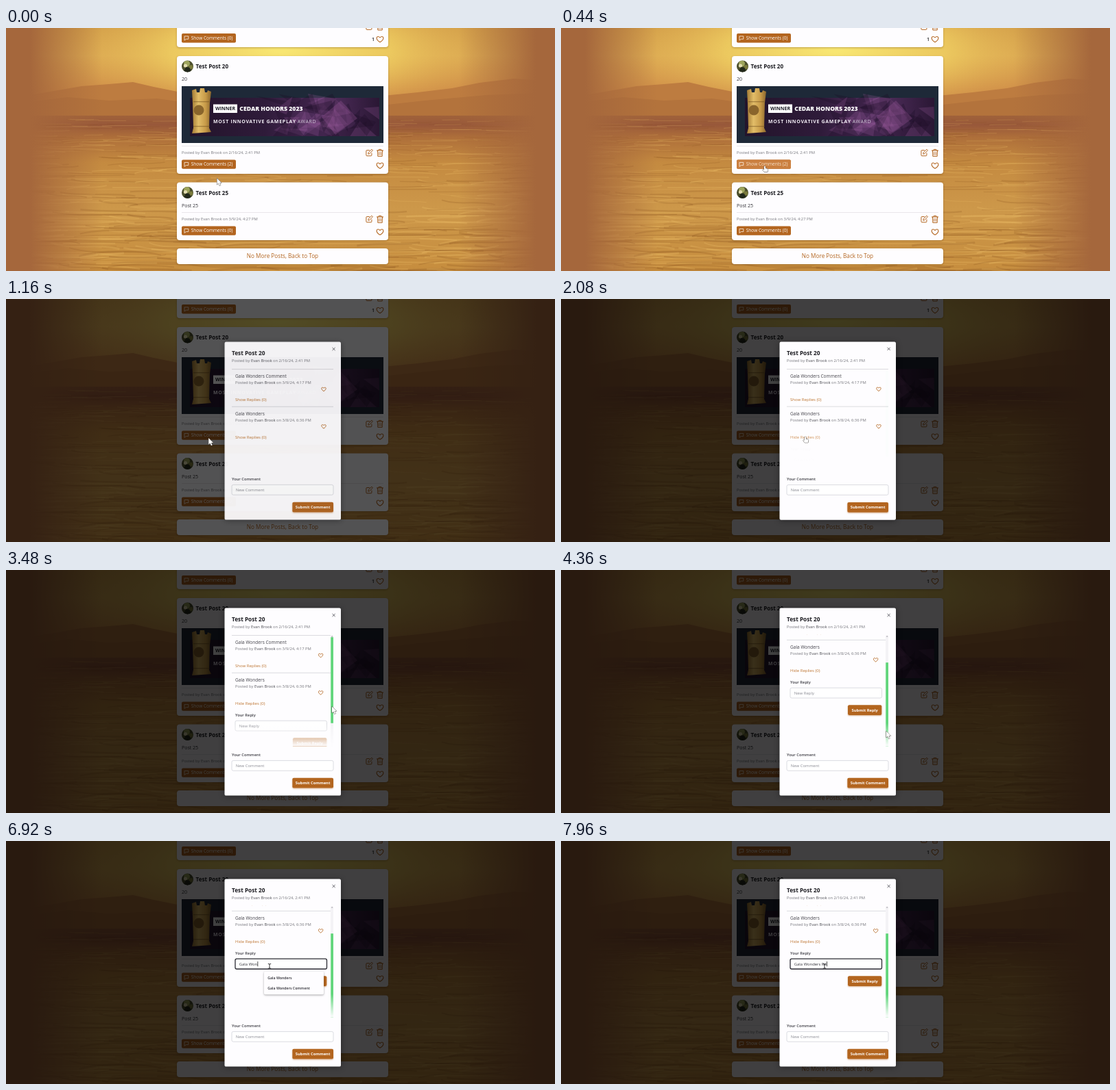
Write an HTML page with a canvas that moves like this. It is 800 by 355 pixels and loops after 8000 ms.

```html
<!DOCTYPE html>
<html lang="en">
<head>
<meta charset="utf-8">
<title>Post comments</title>
<style>
  html, body { margin: 0; width: 100%; height: 100%; overflow: hidden; background: #a5673c; }
  canvas { display: block; width: 100vw; height: 100vh; }
</style>
</head>
<body>
<canvas id="stage"></canvas>
<script>
const W = 800, H = 355, LOOP = 8000;
const FONT = '"Open Sans", "Noto Sans", sans-serif';
const AUTHOR = 'Evan Brook', TOPIC = 'Gala Wonders';
const BROWN = '#b3651f', INK = '#1d1d22', GREY = '#77777d';
const REPLY = TOPIC + ' Re';
const KEY_TIMES = [5400, 5760, 5960, 6160, 6440, 6720, 6840, 6920, 7160, 7200, 7240, 7320, 7680, 7800, 7960];
const dpr = window.devicePixelRatio || 1;

function layer(canvas = document.createElement('canvas')) {
  canvas.width = W * dpr;
  canvas.height = H * dpr;
  const c = canvas.getContext('2d');
  c.scale(dpr, dpr);
  return c;
}
const screen = layer(document.getElementById('stage'));
const scenery = layer(), dialog = layer();
let g = screen;

const clamp = (v) => Math.max(0, Math.min(1, v));
const span = (t, a, b) => clamp((t - a) / (b - a));
const smooth = (u) => u * u * (3 - 2 * u);
const mix = (a, b, u) => a + (b - a) * u;

function seeded(seed) {
  return () => (seed = (seed * 16807) % 2147483647) / 2147483647;
}

// ---------- drawing helpers ----------
function text(s, x, y, size, color = INK, weight = 400, align = 'left', spacing = 0) {
  g.font = `${weight} ${size}px ${FONT}`;
  g.letterSpacing = spacing + 'px';
  g.textAlign = align;
  g.fillStyle = color;
  g.fillText(s, x, y);
  const width = g.measureText(s).width;
  g.letterSpacing = '0px';
  return x + width;
}

function box(x, y, w, h, r, fill, stroke, line = 0.8) {
  g.beginPath();
  g.roundRect(x, y, w, h, r);
  if (fill) { g.fillStyle = fill; g.fill(); }
  if (stroke) { g.strokeStyle = stroke; g.lineWidth = line; g.stroke(); }
}

function shadowBox(x, y, w, h, r, color, blur) {
  g.save();
  g.shadowColor = color;
  g.shadowBlur = blur * dpr;
  g.shadowOffsetY = dpr;
  box(x, y, w, h, r, '#fefdff');
  g.restore();
}

function poly(points, fill) {
  g.beginPath();
  points.forEach(([x, y]) => g.lineTo(x, y));
  g.closePath();
  g.fillStyle = fill;
  g.fill();
}

function strokePath(d, x, y, color, width) {
  g.save();
  g.translate(x, y);
  g.strokeStyle = color;
  g.lineWidth = width;
  g.lineJoin = g.lineCap = 'round';
  g.stroke(new Path2D(d));
  g.restore();
}

function rule(x1, x2, y, color) {
  g.fillStyle = color;
  g.fillRect(x1, y, x2 - x1, 0.8);
}

function disc(x, y, r, fill) {
  g.beginPath();
  g.arc(x, y, r, 0, 7);
  g.fillStyle = fill;
  g.fill();
}

function gradient(x1, y1, x2, y2, ...stops) {
  const gr = g.createLinearGradient(x1, y1, x2, y2);
  stops.forEach(([at, color]) => gr.addColorStop(at, color));
  return gr;
}

// ---------- icons ----------
function heart(x, y, w, line) {
  g.beginPath();
  g.moveTo(x, y + 0.43 * w);
  g.bezierCurveTo(x - 0.85 * w, y - 0.1 * w, x - 0.4 * w, y - 0.68 * w, x, y - 0.24 * w);
  g.bezierCurveTo(x + 0.4 * w, y - 0.68 * w, x + 0.85 * w, y - 0.1 * w, x, y + 0.43 * w);
  g.strokeStyle = BROWN;
  g.lineWidth = line;
  g.stroke();
}

function tools(y) {
  strokePath('M0 -3.8H-3.6Q-4.6 -3.8 -4.6 -2.8V3.4Q-4.6 4.4 -3.6 4.4H2.4Q3.4 4.4 3.4 3.4V0.6' +
    'M-1.6 1.4L-1.2 -0.8 3.4 -5.2 5 -3.6 0.5 0.9Z', 529.5, y, BROWN, 1);
  strokePath('M-4.6 -3.4H4.6M-1.8 -3.4V-5H1.8V-3.4M-3.6 -3.4L-3.2 5H3.2L3.6 -3.4M-1.3 -1V3M1.3 -1V3',
    545, y, BROWN, 1);
}

function avatar(x, y) {
  g.save();
  g.beginPath();
  g.arc(x, y, 8.5, 0, 7);
  g.clip();
  g.fillStyle = '#4c4f2c';
  g.fillRect(x - 9, y - 9, 18, 18);
  disc(x - 1, y - 4, 4.5, '#9da45c');
  disc(x - 3, y - 1, 2.6, '#e2dcae');
  disc(x + 5, y + 1, 3, '#7a7b3c');
  poly([[x - 7, y + 9], [x - 2, y + 1], [x + 3, y + 2], [x + 6, y + 9]], '#22281a');
  g.restore();
}

function commentsButton(y, count, hover = 0) {
  box(256, y, 79, 13.4, 2, BROWN);
  g.globalAlpha = hover;
  box(256, y, 79, 13.4, 2, '#cb8040');
  g.globalAlpha = 1;
  strokePath('M-2.6 -2.6H2.8V1.6H-0.6L-2.6 3.2Z', 263, y + 6.6, '#fff4e8', 0.8);
  text(`Show Comments (${count})`, 269.8, y + 9, 6.5, hover > 0.5 ? '#f7e2cd' : '#fff');
}

// ---------- background ----------
function paintScenery() {
  g = scenery;
  const rnd = seeded(77);
  g.fillStyle = gradient(0, 0, 0, 135, [0, '#d3a04a'], [0.3, '#dcab53'], [0.65, '#d2934a'], [1, '#c08043']);
  g.fillRect(0, 0, W, 140);
  g.save();
  g.scale(1, 0.32);
  const glow = g.createRadialGradient(400, 100, 10, 400, 100, 310);
  glow.addColorStop(0, '#f8e672');
  glow.addColorStop(0.5, 'rgba(240,208,98,.8)');
  glow.addColorStop(1, 'rgba(225,170,80,0)');
  g.fillStyle = glow;
  g.fillRect(0, 0, W, 430);
  g.restore();

  poly([[0, 104], [70, 92], [110, 85], [150, 82], [185, 79], [215, 86], [260, 95], [400, 104], [540, 100],
    [600, 94], [650, 88], [690, 80], [740, 74], [800, 78], [800, 140], [0, 140]], '#bd7c40');
  poly([[0, 112], [90, 101], [150, 106], [220, 103], [300, 114], [520, 116], [610, 106], [700, 98], [800, 94],
    [800, 140], [0, 140]], '#b3733c');

  g.fillStyle = gradient(0, 128, 0, H, [0, '#a0623a'], [0.06, '#98583a'], [0.14, '#ae6f3a'],
    [0.3, '#c48a40'], [0.6, '#cd984a'], [1, '#c68d3e']);
  g.fillRect(0, 128, W, H);
  for (let i = 0; i < 620; i++) {
    const depth = rnd();
    const y = 134 + 221 * Math.pow(depth, 1.25);
    const x = rnd() * W, len = mix(18, 70, depth) * (0.5 + rnd());
    const bend = (rnd() - 0.5) * mix(2, 16, depth);
    g.beginPath();
    g.moveTo(x - len, y + bend);
    g.bezierCurveTo(x - len / 3, y - bend, x + len / 3, y + bend, x + len, y - bend * 0.6);
    g.strokeStyle = rnd() < 0.5 ? 'rgba(238,190,104,.24)' : 'rgba(128,74,28,.2)';
    g.lineWidth = mix(0.8, 3.4, depth * rnd());
    g.stroke();
  }

  const edge = '#a5673c', clear = 'rgba(165,103,60,0)';
  g.fillStyle = gradient(0, 0, 140, 0, [0, edge], [0.25, edge], [1, clear]);
  g.fillRect(0, 0, 140, H);
  g.fillStyle = gradient(W, 0, W - 140, 0, [0, edge], [0.2, edge], [1, clear]);
  g.fillRect(W - 140, 0, 140, H);
}

// ---------- page ----------
function banner() {
  g.save();
  g.beginPath();
  g.rect(256, 85, 294, 83);
  g.clip();
  g.fillStyle = '#1e2938';
  g.fillRect(256, 85, 294, 83);
  g.fillStyle = gradient(268, 0, 544, 0, [0, '#23142b'], [0.4, '#2f1b3a'], [0.7, '#533060'], [1, '#2a1734']);
  g.fillRect(268, 102, 276, 56);
  const rnd = seeded(9);
  for (let i = 0; i < 34; i++) {
    const x = 390 + 150 * rnd(), y = 102 + 56 * rnd(), r = 12 + 24 * rnd();
    const pts = [0, 1, 2].map((k) => {
      const a = rnd() * 2 + k * 2.1;
      return [Math.min(544, x + r * Math.cos(a)), Math.max(96, Math.min(158, y + r * 0.8 * Math.sin(a)))];
    });
    poly(pts, i % 2 ? 'rgba(146,88,152,.25)' : 'rgba(28,14,40,.32)');
  }
  poly([[460, 130], [488, 106], [512, 132], [480, 156]], 'rgba(150,86,150,.32)');

  const gold = gradient(270, 0, 300, 0, [0, '#9d742f'], [0.35, '#e2bd68'], [0.7, '#c79a48'], [1, '#83602a']);
  poly([[271, 91], [277, 89], [278, 94], [282, 94], [283, 88], [289, 88], [290, 94], [293, 94], [294, 91],
    [299, 93], [297, 109], [296, 146], [299, 152], [271, 154], [273, 146], [272, 110]], gold);
  g.fillStyle = 'rgba(110,76,28,.5)';
  g.fillRect(273, 107, 23, 1.3);
  g.fillRect(273, 143, 24, 1.3);
  disc(281, 120, 7.5, '#8a652c');

  g.fillStyle = '#fff';
  g.fillRect(302, 111.5, 35, 12.5);
  text('WINNER', 319.5, 120.4, 7, '#20202a', 700, 'center');
  text('CEDAR HONORS 2023', 340.3, 121, 8.7, '#fff', 800);
  const x = text('MOST INNOVATIVE GAMEPLAY', 302, 138.8, 7, '#f2edf5', 700, 'left', 0.7);
  text('AWARD', x + 2, 138.8, 7, '#d9cfdf', 400, 'left', 0.7);
  g.restore();
}

function card(y, h) {
  shadowBox(249, y, 308, h, 4, 'rgba(90,50,10,.35)', 3);
}

function postHead(y, title, body) {
  avatar(264.5, y);
  text(title, 276.6, y + 3, 8.1, INK, 700);
  text(body, 256, y + 21.2, 7, '#333338');
}

function paintPage(hover) {
  g.drawImage(scenery.canvas, 0, 0, W, H);
  card(-12, 40);
  tools(-2);
  commentsButton(8, 0);
  text('1', 533, 18.8, 7, INK, 600);
  heart(545, 16.4, 10, 1.1);

  card(41, 172);
  postHead(56, 'Test Post 20', '20');
  banner();
  rule(256, 550, 172, '#e4e2e6');
  text(`Posted by ${AUTHOR} on 2/16/24, 2:41 PM`, 256, 184.3, 5.8, GREY);
  tools(182.4);
  commentsButton(192.4, 2, hover);
  heart(545, 201, 10, 1.1);

  card(225.5, 84.5);
  postHead(240.5, 'Test Post 25', 'Post 25');
  rule(256, 550, 269, '#e4e2e6');
  text(`Posted by ${AUTHOR} on 3/9/24, 4:27 PM`, 256, 281.3, 5.8, GREY);
  tools(279.4);
  commentsButton(289.4, 0);
  heart(545, 298, 10, 1.1);

  card(322, 23);
  text('No More Posts, Back to Top', 403, 336.4, 8.2, BROWN, 500, 'center');
}

// ---------- comment dialog ----------
function byline(x, y, when) {
  const end = text('Posted by ', x, y, 5.8, GREY);
  text(` on ${when}`, text(AUTHOR, end, y, 5.8, '#4c4c52'), y, 5.8, GREY);
}

function field(x, y, w, hint, focus) {
  box(x, y, w, 14.8, 2.2, '#fff', focus ? '#2b2b33' : '#d2d3da', focus ? 1.3 : 0.8);
  if (hint) text(hint, x + 5.7, y + 9.6, 6, '#8a8b93');
}

function submit(x, y, w, label) {
  shadowBox(x, y, w, 14.8, 2, 'rgba(179,101,31,.5)', 2);
  box(x, y, w, 14.8, 2, BROWN);
  text(label, x + w / 2, y + 9.5, 5.8, '#fff', 700, 'center');
}

function comment(y, title, when, link, heartX, linkColor) {
  text(title, 334, y + 12.7, 6.55, '#45454b');
  byline(334, y + 21.6, when);
  heart(heartX, y + 29.2, 6.6, 0.9);
  text(link, 334, y + 46.6, 6.05, linkColor);
}

function typed(t) {
  return REPLY.slice(0, KEY_TIMES.filter((k) => k <= t).length);
}

function suggestions(t) {
  const fade = span(t, 5360, 5480);
  if (t < 5400 || t >= 7320) return;
  const items = [TOPIC, TOPIC + ' Comment'];
  if (t < 5800) items.unshift('ghj');
  g.globalAlpha = fade;
  shadowBox(376, 190.5, 87, 3.5 + 15.1 * items.length, 2, 'rgba(0,0,0,.35)', 3);
  items.forEach((s, i) => text(s, 381.2, 202 + 15.1 * i, 5.25, '#2c2c33', 600));
  g.globalAlpha = 1;
}

function paintDialog(t) {
  const open = smooth(span(t, 2060, 2360));
  const scroll = 48 * smooth(span(t, 3480, 4130));
  const h = mix(260, 274, open), top = 192.6 - h / 2, bottom = 192.6 + h / 2;
  const listTop = top + 40, listBottom = bottom - 72;
  const expanded = t >= 2080;
  const right = mix(477, 473, open), heartX = mix(463, 458.6, open);

  shadowBox(318.5, top, 169.5, h, 2.2, 'rgba(0,0,0,.4)', 9);
  text('Test Post 20', 329, top + 19.4, 8.25, INK, 700);
  byline(329, top + 29, '2/16/24, 2:41 PM');
  strokePath('M-1.8 -1.8L1.8 1.8M1.8 -1.8L-1.8 1.8', 477.6, top + 10.4, '#55555c', 0.9);

  g.save();
  g.beginPath();
  g.rect(319, listTop - 0.8, 168, listBottom - listTop + 0.8);
  g.clip();
  const y = listTop - scroll;
  rule(329, right, y - 0.5, '#d3d3d8');
  comment(y, TOPIC + ' Comment', '3/9/24, 4:17 PM', 'Show Replies (0)', heartX, '#bd7430');
  rule(329, right, y + 54.2, '#d3d3d8');
  const hover = t > 1720 && t < 2300;
  comment(y + 54.4, TOPIC, '3/8/24, 6:36 PM', expanded ? 'Hide Replies (0)' : 'Show Replies (0)',
    heartX, hover ? '#cf9055' : '#bd7430');
  if (expanded) {
    g.globalAlpha = open;
    text('Your Reply', 334, y + 118, 5.8, '#3c3c43', 600);
    const reply = typed(t), focus = t >= 4920;
    field(334, y + 124.6, 133.5, reply ? '' : 'New Reply', focus);
    const end = text(reply, 339.8, y + 134.2, 5.9, '#35353c');
    if (focus) {
      g.fillStyle = '#222';
      g.fillRect(end + 0.3, y + 128.4, 0.8, 7.2);
    }
    submit(418, y + 149.6, 49.3, 'Submit Reply');

    g.fillStyle = '#f4f3f6';
    g.fillRect(473, listTop, 4, listBottom - listTop);
    const view = listBottom - listTop;
    const thumb = 125.5;
    const thumbY = listTop + 2.6 + 37 * scroll / 48;
    g.fillStyle = '#62d67c';
    g.fillRect(473.2, thumbY, 3.8, Math.min(thumb, view));
    poly([[473.6, listTop + 1.8], [475.1, listTop + 0.4], [476.6, listTop + 1.8]], '#a0a0a6');
    g.globalAlpha = 1;
  }
  g.fillStyle = gradient(0, listBottom - 34, 0, listBottom, [0, 'rgba(254,253,255,0)'], [1, '#fefdff']);
  g.fillRect(319, listBottom - 34, 168, 35);
  g.restore();

  text('Your Comment', 329, bottom - 57.6, 5.8, '#3c3c43', 600);
  field(329, bottom - 51.2, 148, 'New Comment');
  submit(417.3, bottom - 25.8, 59.7, 'Submit Comment');
  suggestions(t);
}

// ---------- pointer ----------
const PATH = [
  [0, 307.5, 219.5], [400, 297, 201.5], [800, 295.3, 203.3], [1200, 295.3, 203.3], [1660, 356, 201],
  [2880, 356, 201], [3280, 475, 199.5], [3480, 475, 199.5], [4130, 475.5, 236.5], [4320, 475.5, 236.5],
  [4840, 384, 182.8], [LOOP, 384, 182.8]
];

function pointerAt(t) {
  const i = Math.max(1, PATH.findIndex((p) => p[0] > t));
  const [a, b] = [PATH[i - 1], PATH[i]];
  const u = smooth(span(t, a[0], b[0]));
  return [mix(a[1], b[1], u), mix(a[2], b[2], u)];
}

function paintPointer(t) {
  const [x, y] = pointerAt(t);
  const overField = t > 4600 && x < 467 && y < 188;
  const hand = (t > 260 && t < 900) || (t > 1560 && t < 2300);
  if (overField) {
    strokePath('M-1.8 -3.5Q0 -3.5 0 -2.6V2.6Q0 3.5 -1.8 3.5M1.8 -3.5Q0 -3.5 0 -2.6M0 2.6Q0 3.5 1.8 3.5',
      x, y, '#1b1b1f', 0.9);
    return;
  }
  const shape = new Path2D(hand
    ? 'M-0.9 0.6Q0 -0.6 0.9 0.6V3.4L4 4.2Q4.8 4.6 4.6 6L4 8.8H-0.9L-3.2 5.6Q-3 4.4 -0.9 5.6Z'
    : 'M0 0V9.3L2.1 7.3 3.7 10.8 5.2 10.1 3.7 6.7H6.6Z');
  g.save();
  g.translate(x, y);
  g.lineJoin = 'round';
  g.strokeStyle = '#55504c';
  g.lineWidth = 1;
  g.stroke(shape);
  g.fillStyle = '#fff';
  g.fill(shape);
  g.restore();
}

// ---------- frame ----------
function render(t) {
  g = screen;
  const hover = span(t, 270, 390) * (1 - span(t, 900, 1050));
  paintPage(hover);
  if (t >= 880) {
    const dim = 1 - Math.pow(1 - span(t, 860, 1360), 2.5);
    g.fillStyle = `rgba(0,0,0,${0.75 * dim})`;
    g.fillRect(0, 0, W, H);

    g = dialog;
    g.clearRect(0, 0, W, H);
    paintDialog(t);

    g = screen;
    const u = span(t, 870, 1180);
    const grow = 1 - (1 - u) * (1 - u);
    const scale = mix(0.95, 1, grow);
    g.save();
    g.globalAlpha = u;
    g.translate(403.3, 192.6 + 4 * (1 - grow));
    g.scale(scale, scale);
    g.drawImage(dialog.canvas, -403.3, -192.6, W, H);
    g.restore();
  }
  paintPointer(t);
}

paintScenery();
const start = performance.now();
function tick() {
  render((performance.now() - start) % LOOP);
  requestAnimationFrame(tick);
}
tick();
</script>
</body>
</html>
```
